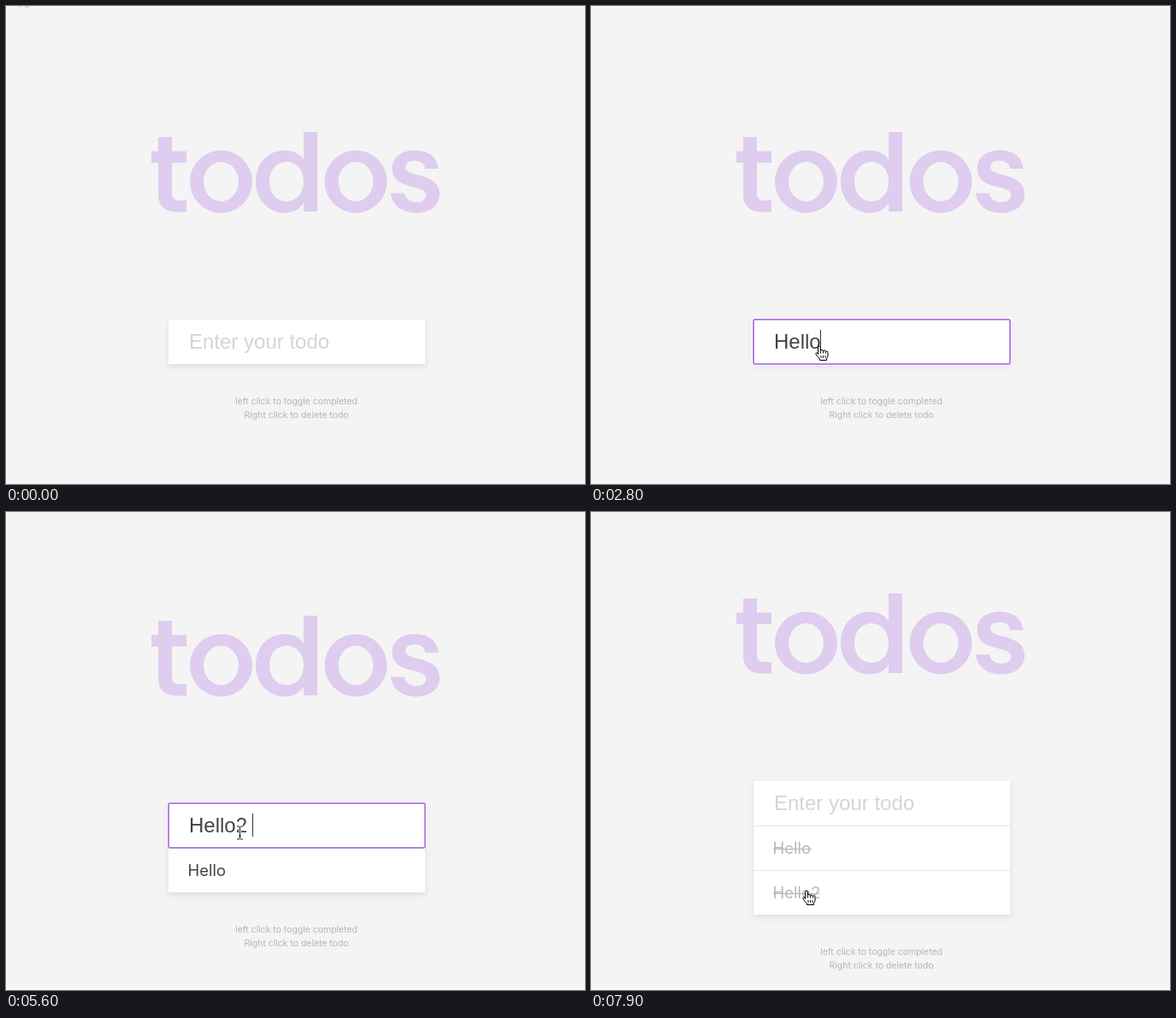
These frames come from a looping animation (677 by 558 pixels, 8 s). An HTML page:

```html
<!DOCTYPE html>
<html lang="en">
<head>
<meta charset="utf-8">
<title>Todos</title>
<style>
  html, body { margin: 0; width: 100%; height: 100%; overflow: hidden; background: #f4f4f4; }
  #box {
    position: absolute; left: 190px; width: 300px;
    background: #fff; box-shadow: 0 3px 7.5px rgba(0, 0, 0, .1);
  }
  svg { position: absolute; left: 0; top: 0; display: block; }
  text { white-space: pre; }
  #heading { fill: #decdee; fill-rule: evenodd; }
  .field { font: 24px "Liberation Sans", Arial, sans-serif; fill: #444; }
  #placeholder { fill: #d5d5d5; }
  .todo { font: 18.4px Inter, sans-serif; fill: #444; }
  .todo .border { fill: #e5e5e5; }
  .todo .strike { fill: none; }
  .todo.done, .todo.done .strike { fill: #b6b6b6; }
  #hints { font: 10.45px Inter, sans-serif; fill: #b5b5b5; text-anchor: middle; }
  #ring rect { fill: none; }
  .cursor { display: none; stroke-linejoin: round; }
</style>
</head>
<body>
<div id="box"></div>
<svg width="677" height="558" viewBox="0 0 677 558">
  <path id="scrap" d="M15.5 0h3M22 .3q2.5 2.6 5-.3" fill="none" stroke="#bbb"/>

  <g id="top">
    <g id="heading" role="img" aria-label="todos">
      <text x="170" y="240" font-size="120" font-family="sans-serif" style="fill:none">todos</text>
      <path d="M178 153H194V169.5H211V183H194V219C194 225 197 227 203 227H211V240.5H200.5C186 240.5 178 234 178 219.5V183H170V169.5H178Z"/>
      <path id="o" d="M215 205a36.5 36.5 0 0 1 73 0a36.5 36.5 0 0 1-73 0zM231 205a20.5 23 0 0 0 41 0a20.5 23 0 0 0-41 0z"/>
      <path d="M348 147H364V240H348V230C343 238 335 241.5 326 241.5C307 241.5 292 226 292 205C292 183 307 168.5 326 168.5C335 168.5 343 172 348 179.5ZM328 182C317 182 308 191 308 205S317 228 328 228S348 219 348 205S339 182 328 182Z"/>
      <use href="#o" x="157.5"/>
      <path d="M505.5 190H490C489.5 184 485 180.5 478 180.5C471 180.5 467 183.5 467 188C467 193 473 195 481 197C494 200.5 507 204.5 507 219.5C507 233 496 241.5 479.5 241.5C463 241.5 451 232 450 218.5H466C466.5 224.5 472 229 479.5 229C487 229 491 225.5 491 221C491 215.5 485 213.5 477 211.5C464.5 208.5 451.5 204.5 451.5 189.5C451.5 177 462 168.5 478 168.5C494.5 168.5 504.5 177 505.5 190Z"/>
    </g>

    <g class="todo">
      <rect class="border" x="190" y="418" width="300" height="1"/>
      <text x="212.6" y="451">Hello</text>
      <rect class="strike" x="213" y="445" width="45" height="1"/>
    </g>
    <g class="todo">
      <rect class="border" x="190" y="470" width="300" height="1"/>
      <text x="212.6" y="503">Hello2</text>
      <rect class="strike" x="213" y="497" width="55" height="1"/>
    </g>

    <g id="ring">
      <rect x="190" y="366" width="300" height="52" rx="2" stroke="#fff" stroke-width="4"/>
      <rect x="190" y="366" width="300" height="52" rx="2" stroke="#b383e2" stroke-width="2"/>
    </g>
    <text id="placeholder" class="field" x="214" y="400">Enter your todo</text>
    <text id="typed" class="field" x="214" y="400"></text>
    <rect id="caret" y="378" width="1" height="27" fill="#333"/>
  </g>

  <g id="hints">
    <text x="339.6" y="465">left click to toggle completed</text>
    <text x="339.6" y="481">Right click to delete todo</text>
  </g>

  <path id="arrow" class="cursor" fill="#fff" stroke="#000"
    d="M.5 .5V16.5L4 13L6.5 18.5L8.8 17.5L6.5 12H11.5Z"/>
  <g id="beam" class="cursor" fill="none">
    <path id="stem" d="M-3.5-7.5h3M.5-7.5h3M0-7V7M-3.5 7.5h3M.5 7.5h3" stroke="#fff" stroke-width="3"/>
    <use href="#stem" style="stroke:#222"/>
    <path d="M-3.5-7.5h3M.5-7.5h3M0-7V7M-3.5 7.5h3M.5 7.5h3M-1.5 3.5h3" stroke="#222" stroke-width="1.1"/>
  </g>
  <g id="hand" class="cursor" stroke="#000">
    <path fill="#fff" d="M-1.5 9.5V1.5Q-1.5 .5 0 .5T1.5 1.5V5.5Q1.5 4.5 3 4.5T4.5 6Q4.5 5 6 5T7.5 6.5Q7.5 6 8.8 6T10 7.5V11Q10 13 8.5 14.5V16.5H.5V15Q-2 12.5-3.7 10Q-4.6 8.2-3.6 7.6Q-2.5 7.4-1.5 9.5Z"/>
    <path fill="none" d="M1.5 5.5V8.5M4.5 6V8.5M7.5 6.5V8.5M2 11v3M4.5 11v3M7 11v3" stroke-width=".9"/>
  </g>
</svg>
<script>
  const LOOP = 8000;
  const $ = id => document.getElementById(id);
  const todos = [...document.querySelectorAll('.todo')];
  const cursors = ['arrow', 'beam', 'hand'];
  const advance = { H: .722, e: .556, l: .222, o: .556, 2: .556, ' ': .278 };

  const start = { text: '', todos: 0, done: 0, focus: false, caret: false, scrap: false, cursor: '', x: 0, y: 0 };
  const move = (cursor, x, y) => ({ cursor, x, y });
  const type = text => ({ text, caret: true });
  const caret = on => ({ caret: on });

  // Each entry changes part of the state from its time on.
  const events = [
    [0, { scrap: true }],
    [100, { scrap: false, ...move('arrow', 40, 40) }],
    [200, move('arrow', 95, 110)],
    [300, move('arrow', 190, 260)],
    [400, move('beam', 262, 374)],
    [500, move('beam', 283, 407)],
    [600, move('beam', 267.5, 398.5)],
    [800, { focus: true, caret: true }],
    [1200, caret(false)],
    [1400, type('H')],
    [1800, type('He')],
    [2100, type('Hel')],
    [2300, type('Hell')],
    [2500, type('Hello')],
    [2800, move('hand', 267, 397)],
    [2900, { text: '', todos: 1 }],
    [3000, caret(false)],
    [3400, { caret: true, ...move('hand', 268, 403) }],
    [3500, move('hand', 271, 410)],
    [3600, move('beam', 273.5, 384.5)],
    [3700, move('beam', 273.5, 374.5)],
    [3900, caret(false)],
    [4400, type('H')],
    [4600, type('He')],
    [4900, type('Hel')],
    [5000, type('Hell')],
    [5200, type('Hello')],
    [5500, type('Hello2')],
    [5600, type('Hello2 ')],
    [6100, { caret: false, ...move('hand', 273, 373) }],
    [6200, { text: '', todos: 2 }],
    [6500, move('hand', 273, 378)],
    [6600, { caret: true, ...move('hand', 274, 388) }],
    [6700, move('hand', 275, 393)],
    [6900, move('hand', 281, 394)],
    [7100, { focus: false, caret: false }],
    [7200, { done: 1 }],
    [7300, move('hand', 278, 402)],
    [7400, move('hand', 268, 420)],
    [7500, move('hand', 260, 434)],
    [7600, move('hand', 254, 440)],
    [7700, move('hand', 252, 442)],
    [7900, { done: 2 }]
  ];

  const show = (el, on) => { el.style.display = on ? 'inline' : 'none'; };
  const shift = (el, x, y) => el.setAttribute('transform', `translate(${x} ${y})`);

  function draw(s) {
    const dy = 26 * s.todos;
    $('box').style.top = 366 - dy + 'px';
    $('box').style.height = 52 * (s.todos + 1) + 'px';
    shift($('top'), 0, -dy);
    shift($('hints'), 0, dy);

    todos.forEach((el, i) => {
      show(el, i < s.todos);
      el.classList.toggle('done', i < s.done);
    });

    show($('scrap'), s.scrap);
    show($('ring'), s.focus);
    show($('placeholder'), !s.text);
    $('typed').textContent = s.text;
    const width = [...s.text].reduce((sum, c) => sum + 24 * advance[c], 0);
    $('caret').setAttribute('x', Math.floor(214.01 + width));
    show($('caret'), s.caret);

    for (const id of cursors) show($(id), id === s.cursor);
    if (s.cursor) shift($(s.cursor), s.x, s.y);
  }

  let last = -1;
  function tick() {
    const t = performance.now() % LOOP;
    const past = events.filter(e => e[0] <= t);
    if (past.length !== last) {
      last = past.length;
      draw(Object.assign({}, start, ...past.map(e => e[1])));
    }
    requestAnimationFrame(tick);
  }
  tick();
</script>
</body>
</html>
```
